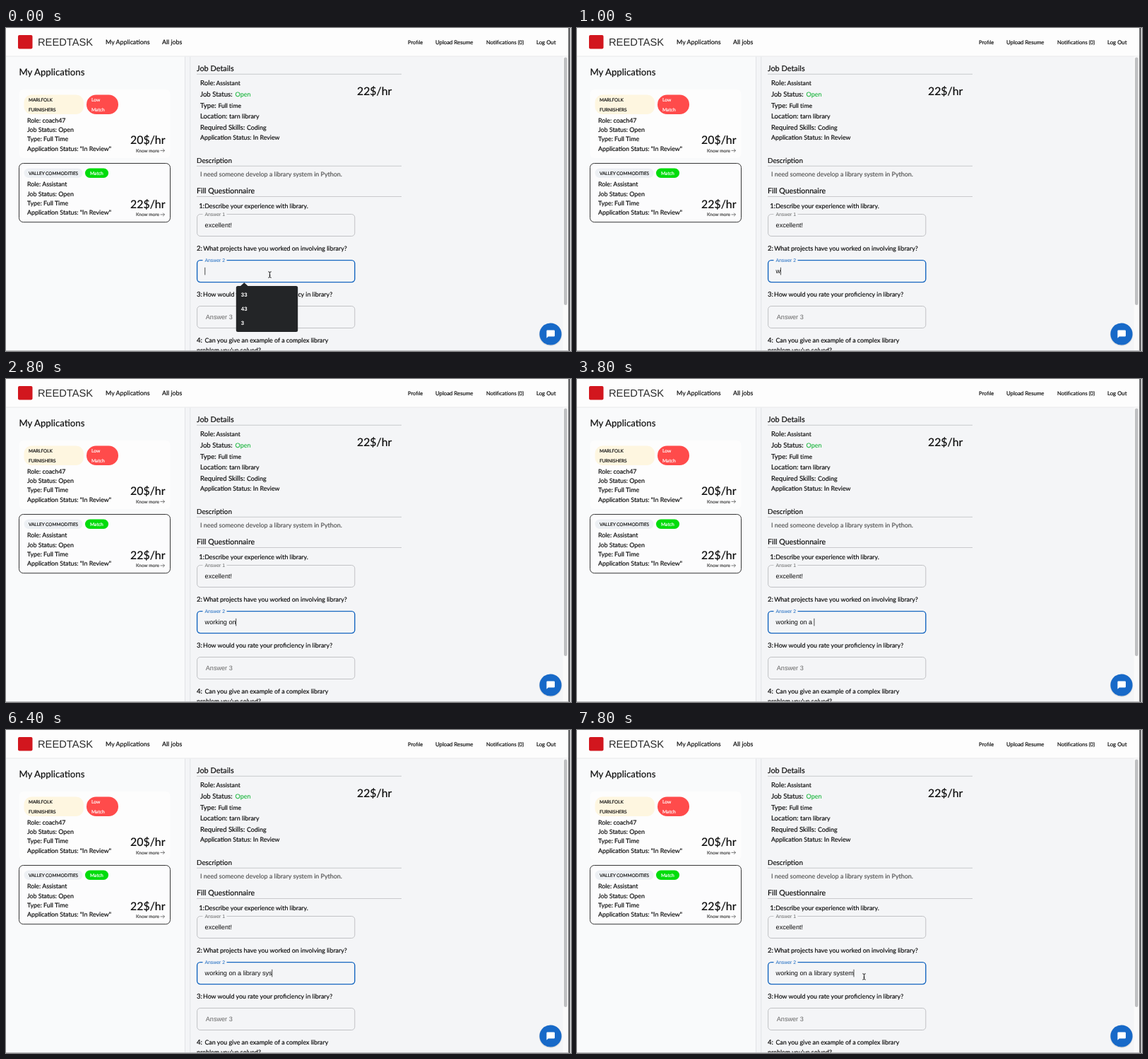
An HTML page for the animation above (8 s loop, 800 px wide and 457 px high).

```html
<!DOCTYPE html>
<html lang="en">
<head>
<meta charset="utf-8">
<title>Job application form</title>
<style>
  html, body { margin: 0; width: 100%; height: 100%; overflow: hidden; background: #f4f5f7; }
  svg { display: block; width: 100%; height: 100%; }
  text {
    font-family: Lato, "Open Sans", sans-serif; white-space: pre; text-rendering: geometricPrecision;
    fill: currentColor; stroke: currentColor; stroke-width: .18px;
  }
  .form { font-family: "Liberation Sans", Arial, sans-serif; stroke: none; }
</style>
</head>
<body>
<svg id="stage" viewBox="0 0 800 457"></svg>
<script>
const stage = document.getElementById('stage');
const BLUE = '#1566c0', PANEL = '#f4f5f7', INK = '#0c0c0c';

function add(tag, attrs, parent = stage) {
  const el = document.createElementNS('http://www.w3.org/2000/svg', tag);
  for (const key in attrs) el.setAttribute(key, attrs[key]);
  return parent.appendChild(el);
}
const rect = (x, y, width, height, fill, rx = 0, more = {}, parent) =>
  add('rect', { x, y, width, height, fill, rx, ...more }, parent);
const path = (d, more, parent) => add('path', { d, fill: 'none', ...more }, parent);

function text(x, y, size, str, color = INK, more = {}, parent) {
  const el = add('text', { x, y, 'font-size': size, color, ...more }, parent);
  el.textContent = str;
  return el;
}
const formText = (x, y, size, str, color, more, parent) =>
  text(x, y, size, str, color, { class: 'form', ...more }, parent);

function header() {
  rect(0, 0, 800, 40, '#fdfdfd');
  rect(0, 39.6, 797, 1, '#e3e4e6');
  rect(17, 10, 20.5, 19.5, '#d2161e', 2);
  formText(45, 25, 14.7, 'REEDTASK', '#2b2b2b');
  text(141, 23, 8.9, 'My Applications');
  text(221, 23, 8.9, 'All jobs');
  text(569, 22.6, 7.5, 'Profile');
  text(608, 22.6, 7.8, 'Upload Resume');
  text(680, 22.6, 7.6, 'Notifications (0)');
  text(751, 22.6, 7.8, 'Log Out');
}

function cardBody(y, role, pay) {
  ['Role: ' + role, 'Job Status: Open', 'Type: Full Time', 'Application Status: "In Review"']
    .forEach((line, i) => text(30, y + i * 13.4, 8.85, line));
  text(225.5, y + 30.8, 15.9, pay, INK, { 'text-anchor': 'end' });
  text(184, y + 42, 6.5, 'Know more', '#444');
  path(`M218.5 ${y + 39.8}h6m-2.3 -2.3l2.3 2.3l-2.3 2.3`, { stroke: '#444', 'stroke-width': 0.7 });
}

function sidebar() {
  rect(0, 40.6, 253.5, 417, '#f9fafb');
  rect(253, 40.6, 1, 417, '#e2e3e6');
  text(18.5, 67, 13.2, 'My Applications');

  rect(18.5, 87, 214, 97, '#fdfdfd', 6);
  rect(25.5, 94.5, 84.5, 27.5, '#fef6e0', 11);
  text(32, 104, 6.4, 'MARLFOLK');
  text(32, 117.6, 6.4, 'FURNISHERS');
  rect(114, 94.5, 45, 27.5, '#ff4b4b', 13.5);
  text(121, 104, 6.7, 'Low', '#fff');
  text(121, 117.6, 6.7, 'Match', '#fff');
  cardBody(133.6, 'coach47', '20$/hr');

  rect(18.5, 191.5, 214, 83.2, '#fcfcfd', 6, { stroke: '#222', 'stroke-width': 0.9 });
  rect(25.5, 198.5, 83, 13.5, '#edf0f4', 6.7);
  text(32, 208, 6.45, 'VALLEY COMMODITIES');
  rect(112, 198.5, 33, 13.5, '#00dc0c', 6.7);
  text(119, 208, 6.7, 'Match', '#fff');
  cardBody(224.2, 'Assistant', '22$/hr');
}

function section(y, size, title, lineY) {
  text(270, y, size, title);
  rect(270, lineY, 290, 0.9, '#c4c5c8');
}

function detail(y, label, valueX, value, color, size = 8.6) {
  text(275, y, 9.6, label);
  text(valueX, y, size, value, color);
}

function question(x, y, n, bodyX, body) {
  text(x, y, 9.6, n + ':');
  text(bodyX, y, 8.9, body);
}

function field(y, label, focused) {
  rect(270.6, y, 223.2, 31, 'none', 4.5,
    { stroke: focused ? BLUE : '#bcbdc0', 'stroke-width': focused ? 1.4 : 0.9 });
  if (!label) return;
  rect(278.5, y - 2, 34, 4, PANEL);
  formText(281.5, y + 2.4, 6.85, label, focused ? BLUE : '#666');
}

function details() {
  rect(254, 40.6, 543, 417, PANEL);
  rect(260.3, 40.6, 0.9, 417, '#dfe1e5');
  section(61, 10.9, 'Job Details', 64.8);
  detail(81, 'Role:', 297.5, 'Assistant');
  detail(97, 'Job Status:', 324.6, 'Open', '#22b843', 9);
  detail(112.6, 'Type:', 300.5, 'Full time');
  detail(128.4, 'Location:', 316, 'tarn library', INK, 8.9);
  detail(144, 'Required Skills:', 341, 'Coding', INK, 8.9);
  text(275, 158, 8.85, 'Application Status: In Review');
  text(497, 95, 15.8, '22$/hr');

  section(191, 9.8, 'Description', 194.8);
  text(275, 210, 8.95, 'I need someone develop a library system in Python.', '#555');
  section(234.2, 10.6, 'Fill Questionnaire', 238);

  question(273.2, 254.6, 1, 281.2, 'Describe your experience with library.');
  field(263.5, 'Answer 1');
  formText(281.6, 282.4, 9.1, 'excellent!');
  question(270, 315, 2, 279.2, 'What projects have you worked on involving library?');
  field(328.6, 'Answer 2', true);
  question(270, 380, 3, 279, 'How would you rate your proficiency in library?');
  field(393.5);
  formText(282.8, 412, 9.1, 'Answer 3', '#666');
  question(270, 444.8, 4, 281.4, 'Can you give an example of a complex library');
  text(270, 459, 8.9, "problem you've solved?");
}

function chrome() {
  rect(788.5, 40.6, 8, 417, '#fafafa');
  rect(790, 41.5, 4.6, 350.5, '#bfc0c2', 2.3);
  rect(796.5, 0, 2, 457, '#2a2b2d');
  rect(798.5, 0, 1.5, 457, '#c9cacc');
  rect(0, 456, 797, 1, '#b9babc');
  add('circle', { cx: 771, cy: 433.8, r: 16.2, fill: '#000', opacity: 0.1 });
  add('circle', { cx: 771, cy: 433, r: 15.6, fill: '#1769c8' });
  path('M766.6 427.6h9.2q1.2 0 1.2 1.2v6.4q0 1.2 -1.2 1.2h-8l-2.4 2.4v-10q0 -1.2 1.2 -1.2z', { fill: '#fff' });
}

function suggestions() {
  const g = add('g', {});
  path('M331.5 365.5L337.3 360.3L343 365.5z', { fill: '#232527' }, g);
  rect(325.8, 365, 87.4, 65, '#232527', 2.5, {}, g);
  ['33', '43', '3'].forEach((s, i) =>
    formText(332.8, 380 + i * 20.2, 7.8, s, '#fff', { 'font-weight': 700 }, g));
  return g;
}

header();
sidebar();
details();
chrome();
const typed = formText(281.6, 347.2, 9.1, '');
const caret = rect(0, 338.8, 0.8, 10.6, '#222');
const popup = suggestions();
const pointer = path('M-2.2 -4.2Q0 -4.2 0 -3Q0 -4.2 2.2 -4.2M0 -3V3M-2.2 4.2Q0 4.2 0 3Q0 4.2 2.2 4.2M-1 0.9H1',
  { stroke: '#111', 'stroke-width': 0.9 });

const ANSWER = 'working on a library system';
const LOOP = 8000, STEP = 200, POINTER_BACK = 7800;
// [time, characters typed]: a pause before "library", then one key per step
const KEYS = [[1000, 1], [2000, 7], [3400, 13], [4200, 13], [7000, 27], [LOOP, 27]];

function typedCount(t) {
  const i = KEYS.findIndex(k => k[0] > t);
  if (i === 0) return 0;
  const [t0, n0] = KEYS[i - 1], [t1, n1] = KEYS[i];
  return Math.floor(n0 + (n1 - n0) * (t - t0) / (t1 - t0) + 1e-6);
}

function draw(time) {
  const t = Math.floor(time % LOOP / STEP) * STEP;
  const count = typedCount(t);
  typed.textContent = ANSWER.slice(0, count);
  caret.setAttribute('x', 281.4 + (count ? typed.getComputedTextLength() : 0));
  popup.style.display = count ? 'none' : '';
  pointer.style.display = !count || t >= POINTER_BACK ? '' : 'none';
  pointer.setAttribute('transform', `translate(${count ? 406.5 : 373.5} 349)`);
}

const start = performance.now();
function tick() {
  draw(performance.now() - start);
  requestAnimationFrame(tick);
}
tick();
</script>
</body>
</html>
```
